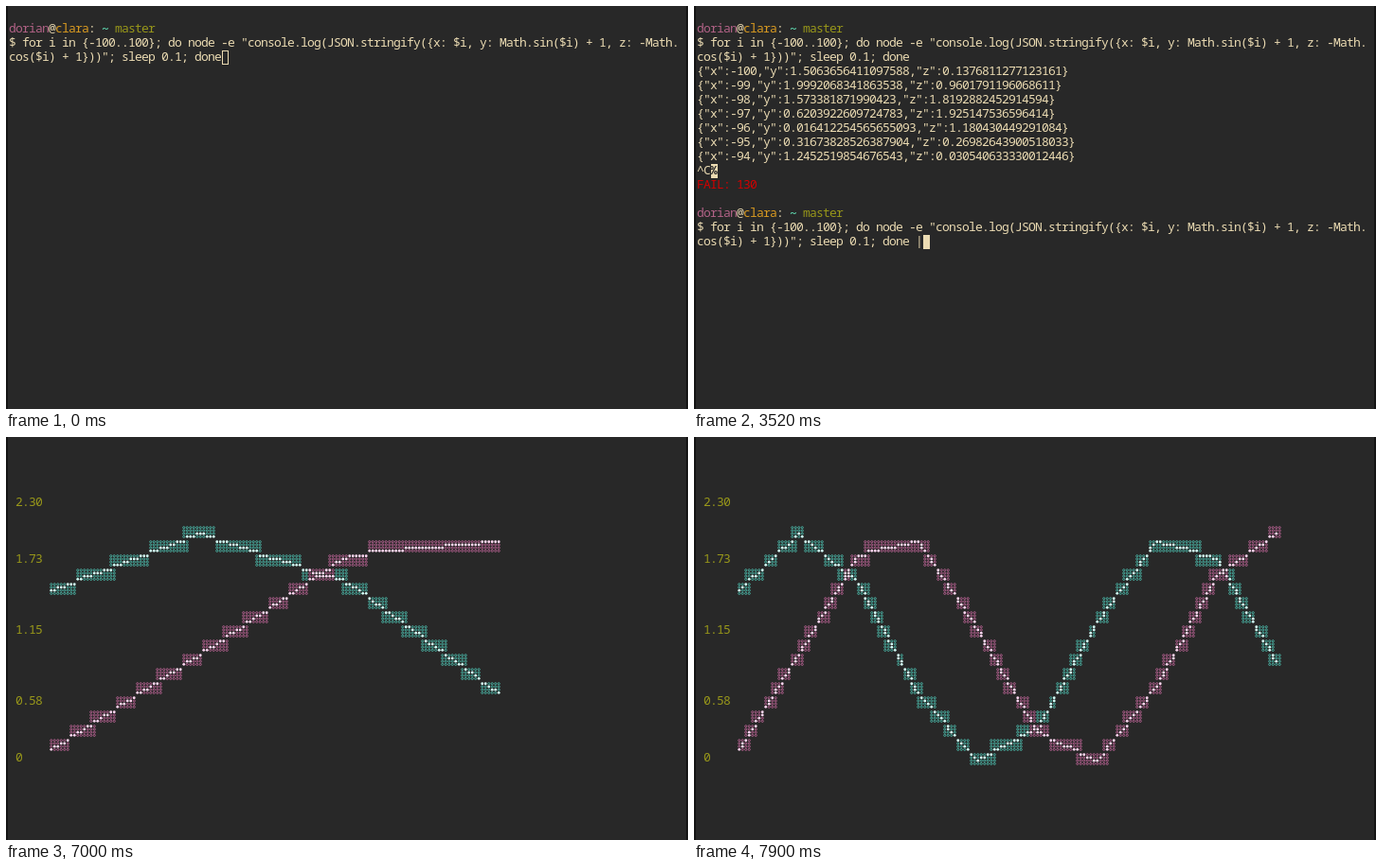
Recreate the animation shown at these times as an HTML page with a canvas. Size 720 by 426 pixels, loop 8 s.

```html
<!DOCTYPE html>
<html lang="en">
<head>
<meta charset="utf-8">
<style>
  html, body { margin: 0; width: 100%; height: 100%; overflow: hidden; background: #282828; }
  canvas { display: block; }
</style>
</head>
<body>
<canvas id="stage" width="720" height="426"></canvas>
<script>
const ctx = document.getElementById('stage').getContext('2d');
const LOOP = 8000, CELL = 7, LINE = 15;
const BG = '#282828', FG = '#ebdbb2', PURPLE = '#b16286', ORANGE = '#d79921',
      AQUA = '#5fd7af', OLIVE = '#98971a', RED = '#d00000';
const TEAL = { ring: '#4fc4b4', dot: '#d4fff8' };
const PINK = { ring: '#c4689c', dot: '#ffd8f2' };

const points = Array.from({ length: 10 }, (_, k) => {
  const i = k - 100;
  return { x: i, y: Math.sin(i) + 1, z: -Math.cos(i) + 1 };
});

// Times in ms at which each output line, typed key or chart update lands
const printTimes = [990, 1180, 1340, 1490, 1640, 1810, 1960];
const typed = ' | xy -n 10';
const keyTimes = [3240, 3520, 3900, 4090, 4270, 4870, 5070, 5270, 5440, 5560, 5680];
const chartTimes = [6860, 7000, 7140, 7290, 7440, 7590, 7740, 7900];
const TEAR = 40;

const passed = (times, t) => times.filter(v => t >= v).length;
const colX = col => 4 + CELL * col;
const rowY = row => 2 + LINE * row;

function drawText(row, col, str, color = FG, weight = 'normal') {
  ctx.font = weight + ' 13px "Noto Sans Mono", "DejaVu Sans Mono", monospace';
  ctx.fillStyle = color;
  [...str].forEach((ch, k) => ctx.fillText(ch, colX(col + k) - 1, rowY(row) + 11));
}

function drawCursor(row, col, hollow) {
  ctx.fillStyle = ctx.strokeStyle = FG;
  if (hollow) ctx.strokeRect(colX(col) + .5, rowY(row) + .5, 6, 14);
  else ctx.fillRect(colX(col), rowY(row), CELL, LINE);
}

function drawPrompt(row) {
  drawText(row, 0, 'dorian', PURPLE);
  drawText(row, 6, '@');
  drawText(row, 7, 'clara', ORANGE);
  drawText(row, 12, ':');
  drawText(row, 14, '~', AQUA, 'bold');
  drawText(row, 16, 'master', OLIVE);
}

function drawCommand(row, tail = '') {
  drawText(row, 0, '$ for i in {-100..100}; do node -e "console.log(JSON.stringify({x: $i, y: Math.sin($i) + 1, z: -Math.');
  drawText(row + 1, 0, 'cos($i) + 1}))"; sleep 0.1; done' + tail);
}

function drawShell(t) {
  drawPrompt(1);
  drawCommand(2);
  const shown = passed(printTimes, t);
  points.slice(0, shown).forEach((p, k) => drawText(4 + k, 0, JSON.stringify(p)));
  if (t < 950) return drawCursor(3, 32, t < 390);
  if (t < 2000) return drawCursor(4 + shown, 0);

  drawText(11, 0, '^C');
  drawCursor(11, 2);
  drawText(11, 2, '%', BG, 'bold');
  drawText(12, 0, 'FAIL: 130', RED);
  drawPrompt(14);
  if (t < 2930) {
    drawText(15, 0, '$');
    return drawCursor(15, 2);
  }
  const keys = passed(keyTimes, t);
  drawCommand(15, typed.slice(0, keys));
  if (t < 6390) drawCursor(16, 32 + keys);
  else drawCursor(17, 0);
}

// Braille cells of both curves through the first n points
function plot(n) {
  const cells = new Map();
  const put = (x, y, color) => {
    const row = 22 - (y >> 2), col = 6 + (x >> 1), key = row * 100 + col;
    const cell = cells.get(key) || { row, col, on: new Set() };
    cell.color = color;
    cell.on.add((3 - (y & 3)) * 2 + (x & 1));
    cells.set(key, cell);
  };
  const curve = (field, color) => {
    const at = k => [Math.floor(180 * k / n), Math.round(points[k][field] * 32.5)];
    for (let k = 1; k < n; k++) {
      const [x0, y0] = at(k - 1), [x1, y1] = at(k);
      const steps = Math.max(x1 - x0, Math.abs(y1 - y0));
      for (let s = 0; s <= steps; s++) {
        const f = s / steps;
        put(Math.round(x0 + (x1 - x0) * f), Math.round(y0 + (y1 - y0) * f), color);
      }
    }
  };
  curve('y', TEAL);
  curve('z', PINK);
  return cells;
}

function drawCell({ row, col, on, color }) {
  ctx.lineWidth = .8;
  ctx.fillStyle = color.dot;
  ctx.strokeStyle = color.ring;
  for (let k = 0; k < 8; k++) {
    const full = on.has(k);
    ctx.beginPath();
    ctx.arc(colX(col) + 1.75 + 3.5 * (k & 1), rowY(row) + 3.75 + 3.2 * (k >> 1), full ? 1.4 : 1.1, 0, 7);
    if (full) ctx.fill();
    else ctx.stroke();
  }
  ctx.lineWidth = 1;
}

function drawChart(t) {
  [[4, '2.30'], [8, '1.73'], [13, '1.15'], [18, '0.58'], [22, '0']]
    .forEach(([row, label]) => drawText(row, 1, label, OLIVE));
  // Cells above the scan position already belong to the next update
  const now = 2 + passed(chartTimes, t), next = 2 + passed(chartTimes, t + TEAR);
  const scan = now === next ? 0 : 613;
  plot(next).forEach((cell, key) => { if (key < scan) drawCell(cell); });
  plot(now).forEach((cell, key) => { if (key >= scan) drawCell(cell); });
}

function draw(t) {
  ctx.fillStyle = '#141414';
  ctx.fillRect(0, 0, 720, 426);
  ctx.fillStyle = BG;
  ctx.fillRect(2, 0, 716, 426);
  if (t < chartTimes[0]) drawShell(t);
  else drawChart(t);
}

const begin = performance.now();
function tick() {
  draw((performance.now() - begin) % LOOP);
  requestAnimationFrame(tick);
}
tick();
</script>
</body>
</html>
```
